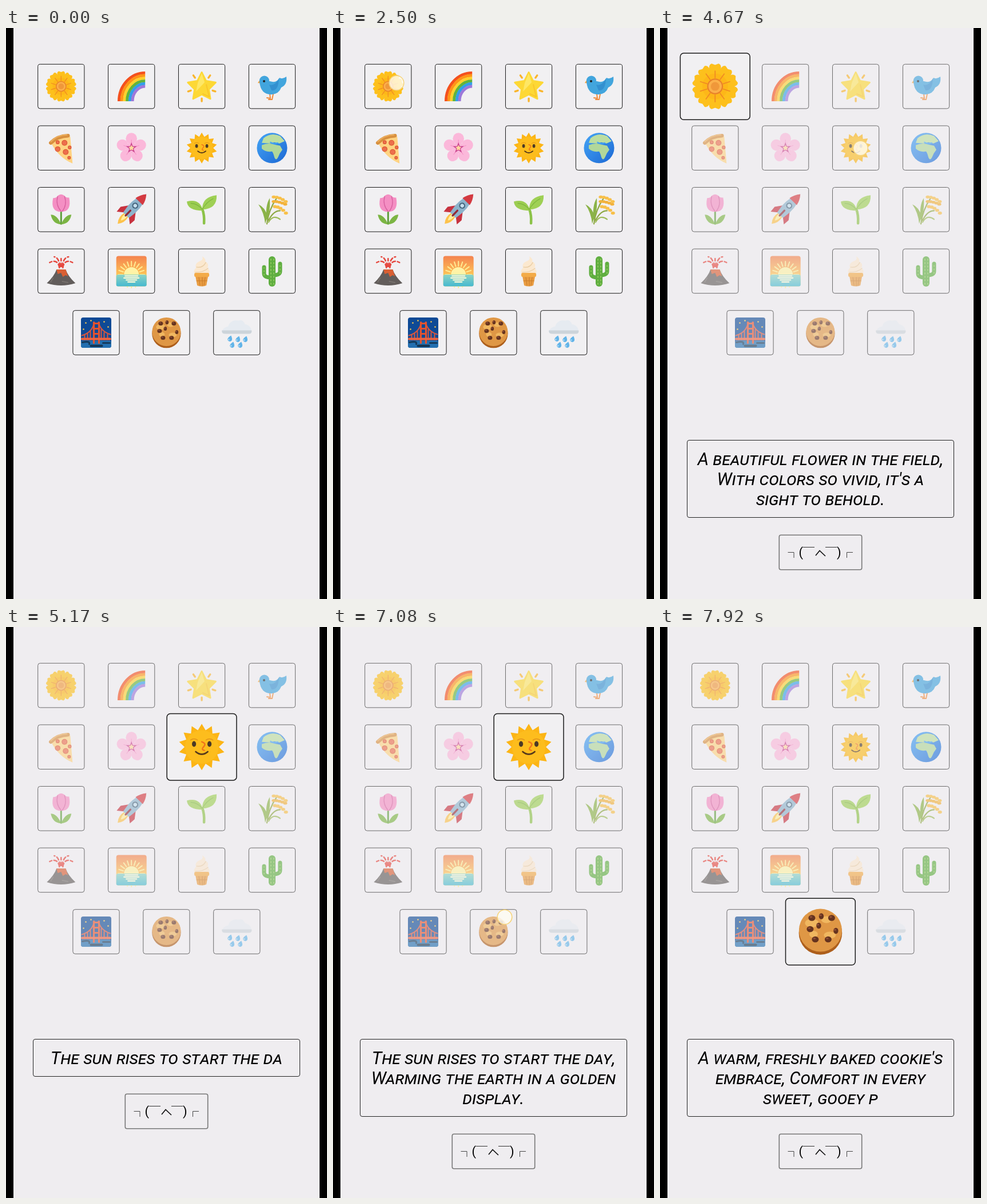
Recreate the animation shown at these times as an HTML page. Size 561 by 998 pixels, loop 8000 ms.

```html
<!DOCTYPE html>
<html lang="en">
<head>
<meta charset="utf-8">
<title>Emoji verses</title>
<style>
  html, body { margin: 0; width: 100%; height: 100%; overflow: hidden; background: #000; }
  #stage { position: relative; width: 561px; height: 998px; overflow: hidden; background: #000; }
  #page { position: absolute; left: 13px; width: 535px; height: 998px; background: #efedf0; }
  #tiles { position: absolute; left: 0; top: 0; }
  #panel { position: absolute; left: 47px; top: 720px; width: 467px; }
  #verse {
    box-sizing: border-box; min-height: 66px; padding: 15px 15px 14px;
    border: 1px solid #222; border-radius: 4px; color: #000; text-align: center;
    font: italic 30.5px/35px Roboto, sans-serif;
  }
  #verse.caps { font-variant-caps: small-caps; }
  #verse small { font-size: .855em; line-height: 1; }
  #face { display: block; margin: 29px auto 0; }
</style>
</head>
<body>
<div id="stage">
  <div id="page"></div>
  <svg id="tiles" width="561" height="998">
    <defs>
      <linearGradient id="sky" x2="0" y2="1"><stop stop-color="#f4834f"/><stop offset=".7" stop-color="#ffcb57"/></linearGradient>
      <linearGradient id="sea" x2="0" y2="1"><stop stop-color="#8fd3c4"/><stop offset="1" stop-color="#45b9d0"/></linearGradient>
      <linearGradient id="ocean" x2="1" y2="1"><stop stop-color="#45a5f5"/><stop offset="1" stop-color="#1c68d4"/></linearGradient>
    </defs>
    <g id="grid"></g>
    <circle id="touch" r="12.8" fill="#fffdf2" fill-opacity=".8" stroke="#f6d47c" stroke-width="1.6"/>
  </svg>
  <div id="panel">
    <div id="verse"></div>
    <svg id="face" width="147" height="63" fill="none" stroke="#111" role="img" aria-label="shrugging face">
      <rect x="1.3" y="1.3" width="144.4" height="60.4" rx="3" stroke="#777" stroke-width="1.6"/>
      <path d="M16.5 31.5H27V41M119.5 41V31.5H130" stroke="#444"/>
      <path d="M43 22.5H63M82 22.5H102" stroke="#333"/>
      <path d="M65 37L72 28.5L82 38" stroke-width="1.7"/>
      <g fill="#000" stroke="none" font-family="Roboto, sans-serif" font-size="22">
        <text x="35.5" y="39">(</text><text x="102" y="39">)</text>
      </g>
    </svg>
  </div>
</div>
<script>
const LOOP = 8000, GROW = 250, TYPE_DELAY = 190, CHAR_MS = 8, FADE = 350;
const FADED = 0.61;
const $ = id => document.getElementById(id);

// Drawing helpers: each returns markup around the tile centre
const fill = (d, c) => `<path d="${d}" fill="${c}"/>`;
const line = (d, c, w = 1, more = '') =>
  `<path d="${d}" fill="none" stroke="${c}" stroke-width="${w}" stroke-linecap="round" stroke-linejoin="round" ${more}/>`;
const oval = (x, y, rx, ry, c) => `<ellipse cx="${x}" cy="${y}" rx="${rx}" ry="${ry}" fill="${c}"/>`;
const dot = (x, y, r, c) => oval(x, y, r, r, c);
const box = (x, y, w, h, r, c) => `<rect x="${x}" y="${y}" width="${w}" height="${h}" rx="${r}" fill="${c}"/>`;
const group = (transform, s) => `<g transform="${transform}">${s}</g>`;
const ring = (n, s) => Array.from({ length: n }, (_, i) => group(`rotate(${i * 360 / n})`, s)).join('');
const spikes = (n, R, r, c, round = 0) => {
  const points = Array.from({ length: 2 * n }, (_, i) => {
    const a = i * Math.PI / n, q = i % 2 ? r : R;
    return `${(q * Math.sin(a)).toFixed(1)},${(-q * Math.cos(a)).toFixed(1)}`;
  });
  return `<polygon points="${points.join(' ')}" fill="${c}" stroke="${c}" stroke-width="${round}" stroke-linejoin="round"/>`;
};
const many = (list, draw) => list.map(draw).join('');

const flower = ring(10, fill('M0-6L-5.5-15Q-9-25-4-26.5L0-25L4-26.5Q9-25 5.5-15Z', '#fdc01c')) +
  dot(0, 0, 15, '#fdb718') + ring(10, line('M0-10V-18', '#f08a24', 1.2)) + dot(0, 0, 9.3, '#e9822a') +
  dot(0, 0, 7.8, '#fbb04a') + dot(0, 0, 5, '#f0983a');

const rainbow = many(['#f4511e', '#ff9418', '#fdd22e', '#62b43c', '#329fe8', '#9d78da'], (c, i) => {
  const rx = 45.7 - 4.7 * i, ry = 49.7 - 4.7 * i;
  return `<path d="M${24 - rx} 26A${rx} ${ry} 0 0 1 24 ${26 - ry}" fill="none" stroke="${c}" stroke-width="5"/>`;
});

const star = group('translate(0 1)', spikes(5, 25.5, 13, '#fdd835', 3) +
  fill('M0-24L5-8L-10 8L-7-7Z', '#fee765') + line('M8-4L13 17L2 12', '#f9c62b', 2) +
  ring(5, line('M0 20V25', '#f9b52c', 3.4)));

const bird = line('M-4 13L-3 21L-9 20M2 13L0 23L-6 23', '#ee8a3c', 2) +
  fill('M-21-12L-25-6L-18-5Z', '#f3a23a') +
  fill('M-22-8Q-20 15 0 14Q12 13 16 2Q27-3 25-17Q18-12 13-15Q8-5-4-9Z', '#42a5dd') +
  dot(-13.5, -10, 8.6, '#42a5dd') + fill('M-5-3Q5 0 12-14Q11 9-1 7Z', '#3390d0') +
  dot(-14, -9, 2, '#222');

const pizza = fill('M-17-8Q-4-18 16-20L20 27Q-4 17-17-8Z', '#ffd382') +
  line('M-18-9Q-6-21 12-21.5', '#d8903f', 6.5) + line('M-18-11Q-6-23 10-23', '#ecae5c', 2) +
  many([[-6, 2, 4.8], [6, -9, 5], [-6, -10, 3.4], [8, 7, 5], [15, -1, 3.2], [14, 17, 3]],
    ([x, y, r]) => dot(x, y, r, '#d9532f') + dot(x, y, r - 1, '#ec6f4c'));

const blossom = ring(5, oval(0, -16.5, 9.8, 10, '#fbb8da')) + dot(0, 0, 10, '#fbb8da') +
  ring(5, line('M0-8V-14', '#f48fc2', 1)) + spikes(5, 10, 4, '#c9408f') + spikes(5, 5.5, 2.8, '#ffd9a0');

const sun = spikes(14, 27, 20, '#fcb515') + dot(0, 0, 19.5, '#fdbd1d') +
  many([-9, 9], x => oval(x, -3.5, 2.4, 3.3, '#4b3a26') + line(`M${x - 4}-8Q${x}-11 ${x + 4}-8`, '#e3941a', 1)) +
  line('M0-6Q6-4 2 0Q-1 3 3 4', '#f0741c', 1.6) + line('M-7 5.5Q0 11.5 7 5.5', '#55391c', 1.8);

const earth = dot(0, 0, 26.5, 'url(#ocean)') +
  fill('M-15-17Q-2-28 14-21L22-12L13-8L4-10L-4-8L-18-9Z', '#bcdda0') +
  fill('M-18-5Q-6-10 4-6L14-4L18 3Q13 9 11 15Q7 24 4 16Q2 8 0 6Q-11 8-18 1Z', '#b1d79a') +
  line('M-3-10L4-7L10-9', '#45a5f5', 1.8);

const tulip = line('M0 0V25', '#5f9e3a', 3) +
  fill('M0 26Q-7 9-18 9Q-15 25 0 26ZM0 26Q7 9 18 9Q15 25 0 26Z', '#7cb544') +
  fill('M-14-20Q-8-20-6-24Q0-29 6-24Q9-20 14-21Q19 4 0 4Q-19 4-14-20Z', '#f48fc3') +
  line('M-6-23Q-10-8 0 3M6-23Q11-8 2 3', '#d7609f', 1.3);

const rocket = group('translate(1 -1) rotate(44)',
  fill('M-5 15Q-8 27 0 36Q8 27 5 15Z', '#fdc24b') + fill('M-3 15Q-4 22 0 28Q4 22 3 15Z', '#fff0a0') +
  fill('M-8-1L-17 11L-16 22L-6 14ZM8-1L17 11L16 22L6 14Z', '#c7323f') +
  fill('M0-36Q10-22 9 0L7 15H-7L-9 0Q-10-22 0-36Z', '#8db3cb') +
  fill('M0-36Q7-28 8.7-18H-8.7Q-7-28 0-36Z', '#d43a41') +
  dot(0, -8, 5.3, '#46657d') + dot(0, -8, 3.2, '#c5dfee') + line('M0 4V16', '#932a36', 3.4));

const seedling = line('M1-1Q5 10 4 24', '#8cc248', 4.5) +
  fill('M2 2Q-25 2-26-14Q-3-20 2 2Z', '#9ccd52') + fill('M1 0Q0-22 26-25Q27-1 1 0Z', '#9fd055') +
  line('M-19-11Q-6-10 1 0Q8-13 20-19', '#7cb53c', 1.2);

const rice = line('M-9 25Q-6 0 8-20M-6 19Q2 2 14 2', '#8da843', 2.2) +
  fill('M-12 25Q-14 5-24-9Q-12-4-8 12ZM-9 20Q-13-6-4-20Q-3-4-6 9Z', '#8bb348') +
  line('M-6 22Q2 8 14 17', '#9dbb58', 2.2) +
  many([0, 1, 2, 3, 4], i => oval(3 + 5.2 * i, -22 + i * i * .5, 3.6, 2.6, '#f8c04a') +
    oval(3 + 5 * i, -14 + i * i * .3, 3.6, 2.5, '#f2b23c') + oval(5 + 4.8 * i, -5 + i * i * .7, 3.6, 2.7, '#f8c04a'));

const volcano = line('M-3-6Q-6-22-20-15M3-6Q6-22 20-15M-2-8Q-4-24-12-25M2-8Q4-24 13-25M0-8V-22',
  '#e6483f', 2.5, 'stroke-dasharray="6 4"') +
  fill('M-25 21Q-12 9-8-3H8Q12 9 25 21Q0 29-25 21Z', '#625d5b') +
  fill('M-8-3H8L12 9L8 7L3 10L0 3L-6 5Z', '#d95f33') + line('M-14 12L-18 19M2 18L12 20', '#79736f', 1.6);

const sunrise = box(-26.5, -26.5, 53, 53, 4, 'url(#sky)') +
  group('translate(0 6)', ring(20, line('M0-15V-23', '#ffec94', 2)) + dot(0, 0, 13, '#fff3a6')) +
  box(-26.5, 6, 53, 20.5, 3, 'url(#sea)') +
  line('M-11 8.5H11M-13 12H13M-9 15.5H9M-6 19H6', '#fffbd8', 2.2);

const iceCream = fill('M1-26Q8-21 6-17Q14-12 10-6Q16 0 12 5H-12Q-16 0-10-6Q-13-14-2-18Q3-20 1-26Z', '#fbe8cf') +
  line('M-9-7Q2-5 7-15M-11 2Q4 2 11-5', '#e9cda5', 1.3) +
  fill('M-11 9H11L8 25Q0 28-8 25Z', '#e99d42') + box(-13, 3, 26, 7, 2.5, '#f3ab48') +
  line('M-5 11L-3 25M1 11V26M6 11L4 25M-9 17H9', '#c97c2a', 1);

const cactus = line('M0 21V-20', '#5fae40', 12) + line('M0 11Q-14 12-14 4V-7M0 7Q14 8 14 0V-13', '#5fae40', 7) +
  line('M-2 23V-21M3 23V-21M-14 7V-6M14 4V-12', '#a5d36c', 1.3, 'stroke-dasharray="2 4"');

const bridge = box(-26.5, -26.5, 53, 53, 4, '#0e4a96') + box(-26.5, 14, 53, 12.5, 4, '#236fb0') +
  many([[-18, -17], [-9, -21], [14, -19], [21, -10], [-22, -6]], ([x, y]) => dot(x, y, 1.3, '#fcc94d')) +
  line('M-25 5Q-7 0-3-18M4-18Q8-2 25 3M-20 4V12M-15 1V12M-10-3V12M9-5V12M14 0V12M20 3V12', '#d8563f', 2) +
  line('M-4 18V-18M5 18V-18M-4-16H5M-4-7H5M-4 2H5', '#e4532f', 3.2) +
  line('M-24.5 11H24.5', '#ee6440', 4) + line('M-24 17Q-10 14-12 20M24 18H12', '#153a5c', 3) +
  line('M-9 23H10', '#143553', 4);

const cookie = dot(0, 1.6, 25.2, '#ad5f1c') + dot(0, -1.6, 25, '#df9745') +
  many([[-10, -10, 8, 5], [7, -14, 6, 4], [-8, 3, 5, 4], [11, 4, 7, 4]], ([x, y, rx, ry]) => oval(x, y, rx, ry, '#f0b760')) +
  many([[-10, -16], [1, -18], [13, -16], [-12, -3], [-2, -7], [18, -1], [-6, 9], [9, 9]], ([x, y], i) =>
    oval(x, y, i % 4 == 1 || i == 4 ? 2.8 : 4, 3.5, '#65331f') + oval(x - 1, y - 1.2, 1.6, 1, '#925039'));

const rain = fill('M-26-2Q-24-9-15-11Q-11-24 3-21Q11-24 14-15Q25-13 26-2Z', '#e6ebf1') +
  fill('M-26-4H26Q27 2 21 2H-20Q-27 2-26-4Z', '#ccd4da') +
  many([[-13, 10], [1, 11], [14, 11], [-9, 21], [5, 21]], ([x, y]) =>
    fill(`M${x + 3} ${y - 5}q3 6 1 9a4 4 0 0 1-7-3q1-3 6-6z`, '#62b4e8') + dot(x - 1, y + 2, 1.2, '#b9e0f6'));

const art = [flower, rainbow, star, bird, pizza, blossom, sun, earth, tulip, rocket, seedling, rice,
  volcano, sunrise, iceCream, cactus, bridge, cookie, rain];

const tiles = art.map((picture, i) => {
  const row = Math.floor(i / 4);
  const tile = document.createElementNS('http://www.w3.org/2000/svg', 'g');
  tile.innerHTML = '<rect x="-40.6" y="-38.8" width="81.2" height="77.6" rx="4" fill="#f1f0f2" stroke="#1a1a1a"/>' + picture;
  $('grid').append(tile);
  return { tile, x: (row < 4 ? 96.3 : 157.5) + i % 4 * 122.9, y: 102.1 + row * 107.6 };
});

const taps = [
  { tile: 0, down: 2500, up: 2672, x: 111, y: 96,
    text: "A beautiful flower in the field, With colors so vivid, it's a sight to behold." },
  { tile: 6, down: 4665, up: 4748, x: 350.5, y: 210,
    text: 'The sun rises to start the day, Warming the earth in a golden display.' },
  { tile: 17, down: 7075, up: 7162, x: 300, y: 507,
    text: "A warm, freshly baked cookie's embrace, Comfort in every sweet, gooey piece." },
];

// True small capitals are wider than scaled-down ones; without them, build them from smaller capitals
const pen = document.createElement('canvas').getContext('2d');
const width = (caps, s) => {
  pen.font = 'italic 100px Roboto, sans-serif';
  pen.fontVariantCaps = caps;
  return pen.measureText(s).width;
};
const trueCaps = width('small-caps', 'heart') > 0.76 * width('normal', 'HEART');
$('verse').classList.toggle('caps', trueCaps);

const setVerse = text => {
  if ($('verse').dataset.text === text) return;
  $('verse').dataset.text = text;
  if (trueCaps) $('verse').textContent = text;
  else $('verse').innerHTML = text.replace(/[a-z]+/g, s => `<small>${s.toUpperCase()}</small>`);
};

const clamp = v => Math.min(1, Math.max(0, v));
const easeOut = p => 1 - (1 - clamp(p)) ** 2;
const mix = (a, b, p) => a + (b - a) * p;

function look(tap, i) {
  const chosen = !!tap && tap.tile === i;
  return { scale: chosen ? 1.5 : 1, opacity: !tap || chosen ? 1 : FADED };
}

function draw(t) {
  const current = taps.findLastIndex(tap => t >= tap.up);
  const tap = taps[current];
  const p = tap ? easeOut((t - tap.up) / GROW) : 1;

  tiles.forEach(({ tile, x, y }, i) => {
    const from = look(taps[current - 1], i), to = look(tap, i);
    tile.setAttribute('transform', `translate(${x} ${y}) scale(${mix(from.scale, to.scale, p)})`);
    tile.setAttribute('opacity', mix(from.opacity, to.opacity, p));
  });

  const press = taps.find(tap => t >= tap.down && t < tap.up);
  $('touch').style.display = press ? '' : 'none';
  if (press) $('touch').setAttribute('transform', `translate(${press.x} ${press.y})`);

  const typing = taps.findLast(tap => t >= tap.up + TYPE_DELAY);
  setVerse(typing ? typing.text.slice(0, Math.floor((t - typing.up - TYPE_DELAY) / CHAR_MS + 0.5)) : '');
  $('verse').style.opacity = easeOut((t - taps[0].up - TYPE_DELAY) / FADE);
  $('face').style.opacity = easeOut((t - taps[0].up) / GROW);
}

const start = performance.now();
function tick() {
  draw((performance.now() - start) % LOOP);
  requestAnimationFrame(tick);
}
tick();
</script>
</body>
</html>
```
